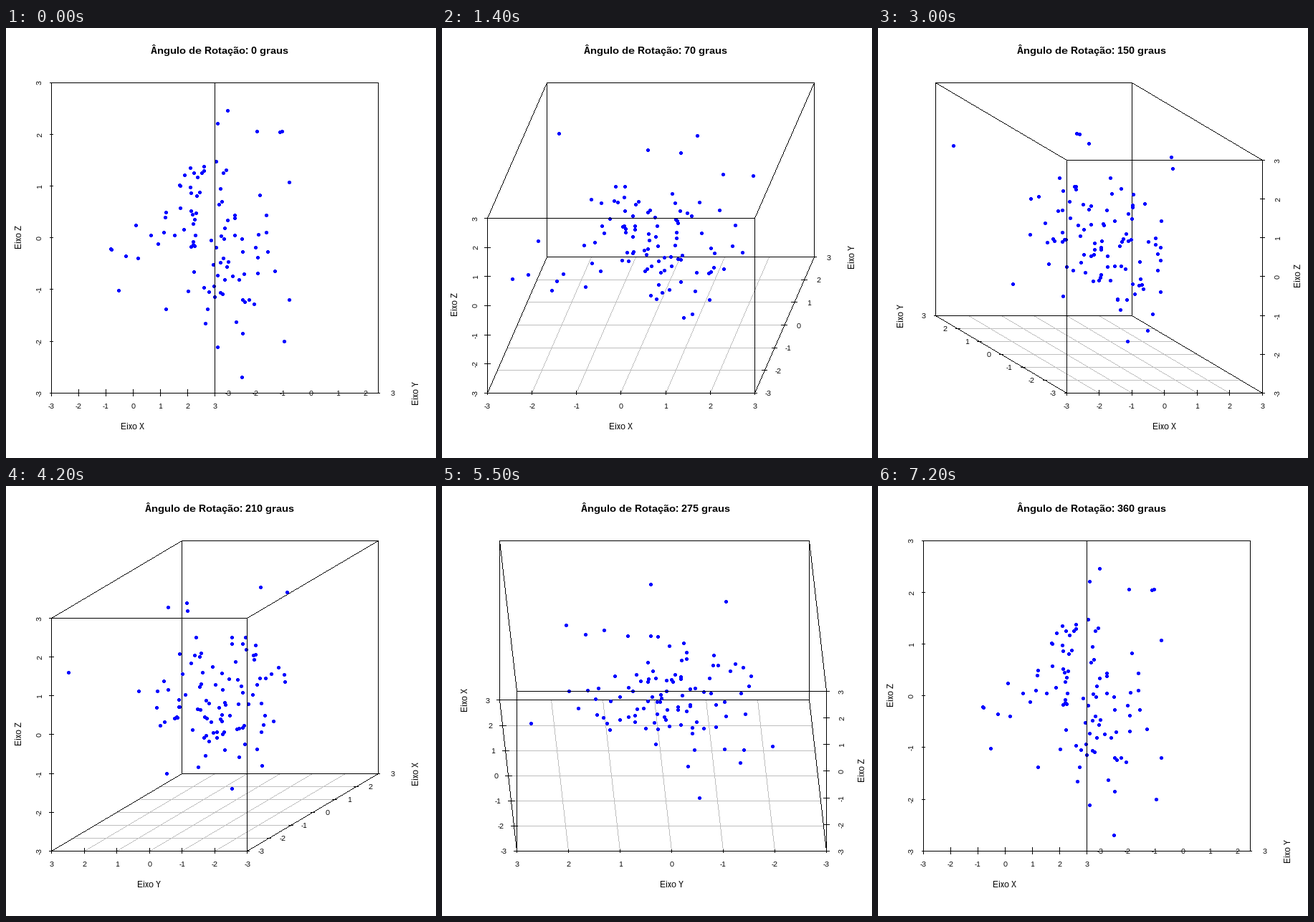
Recreate the animation shown at these times as a matplotlib script. Size 600 px wide and 600 px high, loop 7300 ms.

```python
import math

import numpy as np
import matplotlib.pyplot as plt
from matplotlib.animation import FuncAnimation

SIZE, DPI = 600, 100
PX = 72 / DPI                      # points per pixel
LEFT, RIGHT = 63.56, 536.44        # drawing area in pixels
TOP, BOTTOM = 76.36, 509.24
GAP = 17.35                        # room kept for the depth labels
TICKS = range(-3, 4)
STEP, FRAMES, INTERVAL = 5, 73, 100
BLACK, GREY, BLUE = (0, 0, 0), (190, 190, 190), (0, 0, 255)

plt.rcParams.update({
    "font.family": "Liberation Sans",
    "text.hinting": "native",
    "text.hinting_factor": 1,
})


def inverse_normal(p):
    """Quantile of the standard normal, by Newton's method."""
    x = 0.0
    for _ in range(30):
        cdf = 0.5 * math.erfc(-x / math.sqrt(2))
        x -= (cdf - p) * math.sqrt(2 * math.pi) * math.exp(x * x / 2)
    return x


def normal_sample(seed, n):
    """Normal numbers by inversion of a Mersenne Twister with LCG seeding."""
    chain = []
    for _ in range(50 + 625):
        seed = (69069 * seed + 1) % 2**32
        chain.append(seed)
    gen = np.random.MT19937()
    gen.state = {
        "bit_generator": "MT19937",
        "state": {"key": np.array(chain[51:], dtype=np.uint32), "pos": 624},
    }
    u = gen.random_raw(2 * n) * 2.3283064365386963e-10
    big = 2**27
    p = (np.floor(big * u[0::2]) + u[1::2]) / big
    return np.array([inverse_normal(v) for v in p])


X, Y, Z = normal_sample(42, 300).reshape(3, 100)

fig = plt.figure(figsize=(SIZE / DPI, SIZE / DPI), dpi=DPI, facecolor="white")
ax = fig.add_axes([0, 0, 1, 1])
ax.set_axis_off()
canvas = np.full((SIZE, SIZE, 3), 255, dtype=np.uint8)
picture = ax.imshow(canvas, extent=(0, SIZE, SIZE, 0), aspect="auto",
                    interpolation="nearest")
labels = []


class View:
    """Oblique projection of the cube -3..3 for one angle in degrees."""

    def __init__(self, degrees):
        a = degrees % 360 / 90
        self.swapped = a > 2
        self.leftward = 1 < a < 2 or a > 3
        self.rise = a if a < 1 else 4 - a if a > 3 else abs(2 - a)
        self.shift = 1 - a if a < 2 else 3 - a
        self.ux = (RIGHT - LEFT - GAP) / (6 + 6 * abs(self.shift))
        self.uz = (BOTTOM - TOP) / (6 + 6 * self.rise)
        self.x0 = RIGHT - 6 * self.ux if self.leftward else LEFT

    def project(self, h, d, v):
        """Pixel place of a point: across, into the depth, upwards."""
        px = self.x0 + self.ux * (h + 3 + self.shift * (d + 3))
        py = BOTTOM - self.uz * (v + 3 + self.rise * (d + 3))
        return px, py


def line(start, end, color):
    """Hard one pixel line on the canvas."""
    (x0, y0), (x1, y1) = np.floor(start), np.floor(end)
    n = int(max(abs(x1 - x0), abs(y1 - y0))) + 1
    cols = np.floor(np.linspace(x0, x1, n) + 0.5).astype(int)
    rows = np.floor(np.linspace(y0, y1, n) + 0.5).astype(int)
    canvas[rows, cols] = color


def dot(x, y):
    """Five pixel disc without its corners."""
    col, row = int(x), int(y)
    canvas[row - 2:row + 3, col - 1:col + 2] = BLUE
    canvas[row - 1:row + 2, col - 2:col + 3] = BLUE


def label(x, y, s, px, ha="center", rotation=0, weight="normal"):
    labels.append(ax.text(x, y, s, fontsize=px * PX, ha=ha, va="baseline",
                          weight=weight, rotation=rotation,
                          rotation_mode="anchor"))


def draw_box(view):
    p = view.project
    for i in range(-2, 3):
        line(p(i, -3, -3), p(i, 3, -3), GREY)
        line(p(-3, i, -3), p(3, i, -3), GREY)
    for a in (-3, 3):
        for b in (-3, 3):
            line(p(-3, a, b), p(3, a, b), BLACK)
            line(p(a, -3, b), p(a, 3, b), BLACK)
            line(p(a, b, -3), p(a, b, 3), BLACK)


def draw_front(view):
    p = view.project
    line(p(-3, -3, 3), p(3, -3, 3), BLACK)
    for a in (-3, 3):
        line(p(a, -3, -3), p(a, -3, 3), BLACK)


def draw_axes(view):
    p = view.project
    depth_side, z_side = (-3, 3) if view.leftward else (3, -3)
    tx, tz = 0.06 * view.ux, 0.06 * view.uz
    for i in TICKS:
        x, y = p(i, -3, -3)
        line((x, y - tz), (x, y + tz), BLACK)
        label(x, 531, str(-i if view.swapped else i), 10)

        x, y = p(z_side, -3, i)
        line((x - tx, y), (x + tx, y), BLACK)
        label(561 if view.leftward else 50, y, str(i), 10, rotation=90)

        x, y = p(depth_side, i, -3)
        line((x - tx, y), (x + tx, y), BLACK)
        if view.leftward:
            label(x - 14.4, y + 4, str(i), 10, ha="right")
        else:
            pad = 0 if i < 0 else 2.8
            label(x + 14.4 + pad, y + 4, str(i), 10, ha="left")

    across, deep = ("Eixo Y", "Eixo X") if view.swapped else ("Eixo X", "Eixo Y")
    label(p(0, -3, -3)[0] - 0.5, 560, across, 12)
    label(36 if view.leftward else 576, p(3, 3, -3)[1], deep, 12, rotation=90)
    label(590 if view.leftward else 22, p(0, -3, 0)[1] - 1.5, "Eixo Z", 12,
          rotation=90)


def draw_points(view):
    h, d = (-Y, X) if view.swapped else (X, Y)
    for x, y in zip(*view.project(h, d, Z)):
        dot(x, y)


def draw(frame):
    while labels:
        labels.pop().remove()
    canvas[:] = 255
    degrees = frame * STEP
    view = View(degrees)
    draw_box(view)
    draw_axes(view)
    draw_points(view)
    draw_front(view)
    picture.set_data(canvas)
    label(298.5, 36, f"Ângulo de Rotação: {degrees} graus", 14, weight="bold")
    return []


anim = FuncAnimation(fig, draw, frames=FRAMES, interval=INTERVAL,
                     init_func=lambda: draw(0), repeat=True, repeat_delay=0)
plt.show()
```
